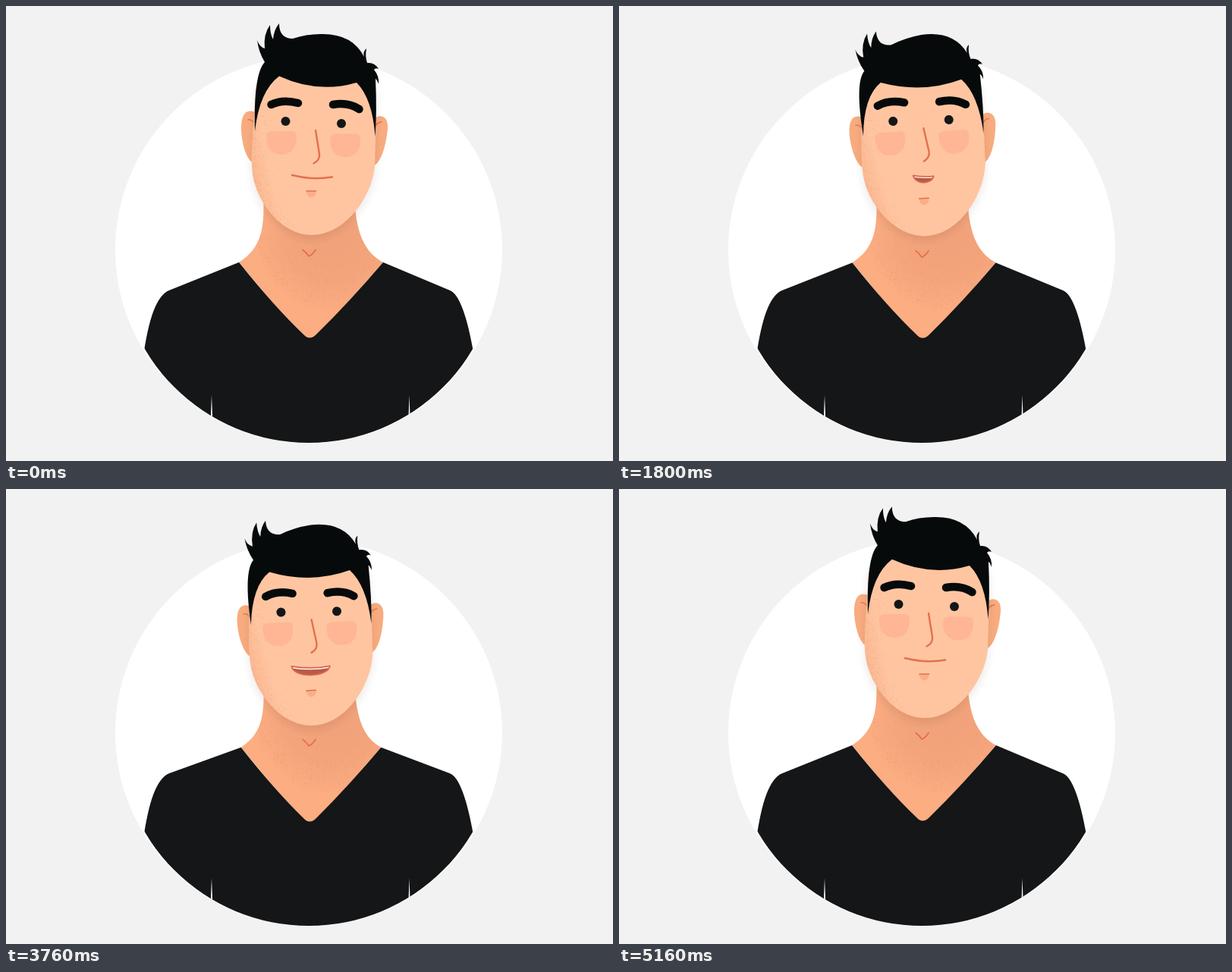
An HTML page with a canvas that plays this animation: 800 px wide and 600 px high, repeating every 5.2 s.

```html
<!DOCTYPE html>
<html lang="en">
<head>
<meta charset="utf-8">
<title>Talking portrait</title>
<style>
html, body { margin: 0; width: 100%; height: 100%; overflow: hidden; background: #f2f2f2; }
canvas { display: block; width: 800px; height: 600px; }
</style>
</head>
<body>
<canvas id="stage" width="800" height="600"></canvas>
<script>
const ctx = document.getElementById('stage').getContext('2d');
const LOOP = 5200, STEP = 40, SYLLABLE = LOOP / 10;
const INK = '#060a0b', SHIRT = '#141617', LINE = '#e4704f';
const PIVOT = { x: 404, y: 170 };

// Turning points of the motion: time, turn to the side, head drop, face drop
const KEYS = [
  [0, 0, 0, 0],
  [300, 0, 2, 4],
  [900, .05, -6, -15],
  [1400, .85, 5, 3],
  [1800, .95, 1.5, -2.5],
  [2520, .2, 4.5, 7.5],
  [2850, 0, -5, -11],
  [3760, .8, 10, 8.5],
  [4360, 1.05, 9, 12],
  [4650, .6, 1, 1],
  [5160, 0, 0, 0]
];

const clamp = v => Math.max(0, Math.min(1, v));
const ease = (a, b, t) => {
  const u = clamp((t - a) / (b - a));
  return u * u * (3 - 2 * u);
};

function pose(t) {
  const i = KEYS.findLastIndex(k => k[0] <= t);
  const a = KEYS[i], b = KEYS[i + 1] || a;
  const u = a === b ? 0 : ease(a[0], b[0], t);
  const [turn, head, face] = [1, 2, 3].map(c => a[c] + (b[c] - a[c]) * u);
  return {
    dx: -6.2 * turn,
    roll: -4.1 * turn * Math.PI / 180,
    head, face,
    hair: (head + face) / 2,
    lag: 9.3 * Math.sin(Math.PI * t / LOOP)
  };
}

// One opening per syllable, growing louder, with a rounded vowel on the way.
function speech(t) {
  const talking = ease(1000, 1200, t) * (1 - ease(4650, 4950, t));
  const beat = Math.cos(Math.PI * (t - 4360) / SYLLABLE) ** 2;
  const open = talking * (3 + (5 + 9 * (t / LOOP) ** 3) * beat);
  const round = 13 * Math.exp(-(((t - 1800) / 220) ** 2));
  return { open, half: 26.5 - round - .8 * Math.max(0, open - 8) };
}

function seeded(s) {
  return () => (s = (s * 16807) % 2147483647) / 2147483647;
}

const asPath = p => typeof p === 'string' ? new Path2D(p) : p;

function fill(path, color) {
  ctx.fillStyle = color;
  ctx.fill(asPath(path));
}

function stroke(path, color, width) {
  ctx.strokeStyle = color;
  ctx.lineWidth = width;
  ctx.stroke(asPath(path));
}

function shifted(dx, dy, draw) {
  ctx.save();
  ctx.translate(dx, dy);
  draw();
  ctx.restore();
}

function clipped(path, draw) {
  ctx.save();
  ctx.clip(path);
  draw();
  ctx.restore();
}

function circle(x, y, r) {
  const p = new Path2D();
  p.arc(x, y, r, 0, 7);
  return p;
}

function gradient(g, ...stops) {
  stops.forEach((c, i) => g.addColorStop(i / (stops.length - 1), c));
  return g;
}

const disc = circle(399, 321.5, 255);
const shirtEdge = circle(399, 325.4, 250.6);
const face = new Path2D('M329 110C327 150 323 190 324 212C326 255 362 302 403 302C447 302 482 252 486 212C487 180 488 150 487 110Q475 75 408 70Q345 72 329 110Z');
const blush = 'M343 173Q343 165 351 165H376Q384 165 383 174C383 188 375 196 363 196C350 196 343 186 343 173Z';
const faceTone = gradient(ctx.createLinearGradient(324, 240, 352, 234), 'rgba(247,168,128,.5)', 'rgba(247,168,128,0)');
const neckTone = gradient(ctx.createRadialGradient(430, 300, 25, 430, 300, 105), '#f1a27a', '#f4a57c', '#fcad82');

const rnd = seeded(71);
const faceGrain = Array.from({ length: 400 }, () => {
  const y = 125 + rnd() * 165, edge = y < 212 ? 325 : 325 + (y - 212) ** 2 / 170;
  return [edge + rnd() * rnd() * 34, y];
});
const neckGrain = Array.from({ length: 900 }, () => {
  const a = rnd() * Math.PI, r = 35 + 65 * Math.sqrt(rnd());
  return [430 + r * Math.cos(a), 300 + r * Math.sin(a)];
});

function grain(dots, color) {
  ctx.fillStyle = color;
  for (const [x, y] of dots) ctx.fillRect(x, y, 1, 1);
}

function drawNeck(drop) {
  const c = drop * .27, y = 338 + c;
  const neck = new Path2D(`M339 245C341 292 ${338 + c} ${318 + c} ${307 + c} ${y}L400 450L${497 - c} ${y}C${473 - c} ${325 + c} 460 300 459 245Z`);
  fill(neck, neckTone);
  clipped(neck, () => grain(neckGrain, 'rgba(226,138,100,.25)'));
  shifted(0, drop * .88, () => stroke('M391 321.5Q396 325 399 330Q404 328 408 321.5', LINE, 1.8));
}

function drawShirt(drop) {
  const c = drop * .27, y = 338 + c, v = 433 + drop * .1;
  clipped(shirtEdge, () => {
    fill(`M181 462C188 413 198 382 215 375L${307 + c} ${y}Q355 398 392 ${v}Q400 ${v + 9} 409 ${v}Q452 391 ${497 - c} ${y}L585 375C600 380 611 425 617 462V600H181Z`, SHIRT);
    fill('M271 513L272.2 544H269.8ZM531.6 513L532.6 544H530.4Z', '#fff');
  });
}

function drawEars() {
  fill('M331 142C318 133 310 142 310 160C310 182 318 206 327 207Z', '#f8ab7e');
  fill('M484 149C494 141 504 146 503 161C501 185 494 207 484 211Z', '#f8ab7e');
  stroke('M319 150Q325 149 328 157', LINE, 1.3);
  stroke('M495 153Q488 153 486 161', LINE, 1.3);
}

function drawFace() {
  ctx.save();
  ctx.shadowColor = 'rgba(70,30,10,.1)';
  ctx.shadowBlur = 12;
  ctx.shadowOffsetY = 6;
  fill(face, '#fec5a0');
  ctx.restore();
  clipped(face, () => {
    fill(face, faceTone);
    grain(faceGrain, 'rgba(238,150,112,.3)');
  });
}

// The quiff trails behind the head; the pull fades to the right and downwards.
function drawHair(lag, side) {
  const p = new Path2D();
  const drag = (x, y) => {
    const f = lag * clamp((430 - x) / 60) * clamp((130 - y) / 50);
    return [x - .7 * f, y + .9 * f];
  };
  const to = (cx, cy, x, y) => p.quadraticCurveTo(...drag(cx, cy), ...drag(x, y));
  const left = [328, 165 + side], right = [486.5, 172 + side];
  p.moveTo(...left);
  to(326, 90, 341, 74);
  // quiff
  to(333, 61, 331, 45);
  to(334, 54, 341, 56);
  to(339, 37, 348, 25);
  to(348, 37, 352, 44);
  to(353, 31, 360, 23);
  to(360, 43, 378, 43);
  // crown
  to(395, 37, 415, 37);
  to(456, 36, 472, 67);
  // right tufts
  to(470, 60, 475, 56);
  to(473, 66, 476, 75);
  to(486, 74, 491, 83);
  to(487, 81, 485, 84);
  to(492, 92, 491, 103);
  to(489, 97, 487, 96);
  // sideburns and fringe
  to(489, 140, ...right);
  to(483, 122, 462, 101);
  to(411, 116, 360, 92.5);
  to(334, 112, ...left);
  fill(p, INK);
}

function drawEyes(open) {
  for (const [x, y] of [[368.5, 152], [442, 155]]) {
    ctx.beginPath();
    ctx.ellipse(x, y, 6, 6 * open, 0, 0, 7);
    ctx.fillStyle = SHIRT;
    ctx.fill();
  }
}

function drawMouth({ half, open }) {
  const dip = 1.5 + .7 * Math.max(0, half - 21);
  const top = `M${-half} -1.5Q0 ${dip} ${half} 1`;
  if (open < .4) return stroke(top, LINE, 2.5);
  const low = (dip / 2 + open) * 1.3;
  const shape = new Path2D(`${top}C${half - 3} ${low} ${3 - half} ${low} ${-half} -1.5Z`);
  fill(shape, '#b65b48');
  clipped(shape, () => stroke(top, '#fff8f2', Math.max(3, open * .5)));
  stroke(shape, '#d9674b', 1.8);
}

function drawChin() {
  fill('M395.5 244H409Q408 252.5 402 252.5Q397 252.5 395.5 244Z', 'rgba(250,165,130,.75)');
  stroke('M396 244H408.5', LINE, 1.5);
}

function render(t) {
  const { dx, roll, head, face: faceDrop, hair, lag } = pose(t);
  const mouth = speech(t);
  const blink = Math.max(.15, clamp(Math.abs(t - 2490) / 90));
  const nod = faceDrop - head;

  ctx.fillStyle = '#f2f2f2';
  ctx.fillRect(0, 0, 800, 600);
  fill(disc, '#fff');
  ctx.lineCap = ctx.lineJoin = 'round';

  drawNeck(head);
  drawShirt(head);

  ctx.save();
  ctx.translate(PIVOT.x + dx, PIVOT.y + head);
  ctx.rotate(roll);
  ctx.translate(-PIVOT.x, -PIVOT.y);
  drawEars();
  drawFace();
  shifted(0, hair - head, () => drawHair(lag, head - hair));
  shifted(0, nod * .8, () => {
    fill(blush, '#ffb695');
    shifted(84, 3.5, () => fill(blush, '#ffb695'));
  });
  shifted(0, nod, () => {
    drawEyes(blink);
    stroke('M408 164L413 195Q414 203 405.5 207.5', LINE, 2.4);
  });
  shifted(0, nod * .9, () => {
    stroke('M349.5 130Q365 122.5 385 128', INK, 10.5);
    stroke('M431 130Q451 126.5 465.5 136', INK, 10.5);
  });
  shifted(403.5, 224.5 + nod * .4, () => drawMouth(mouth));
  shifted(0, mouth.open * (.45 + .028 * mouth.half) - nod * .4, drawChin);
  ctx.restore();
}

const start = performance.now();
function tick(now) {
  const t = Math.max(0, now - start) % LOOP;
  render(Math.floor(t / STEP) * STEP);
  requestAnimationFrame(tick);
}
render(0);
requestAnimationFrame(tick);
</script>
</body>
</html>
```
